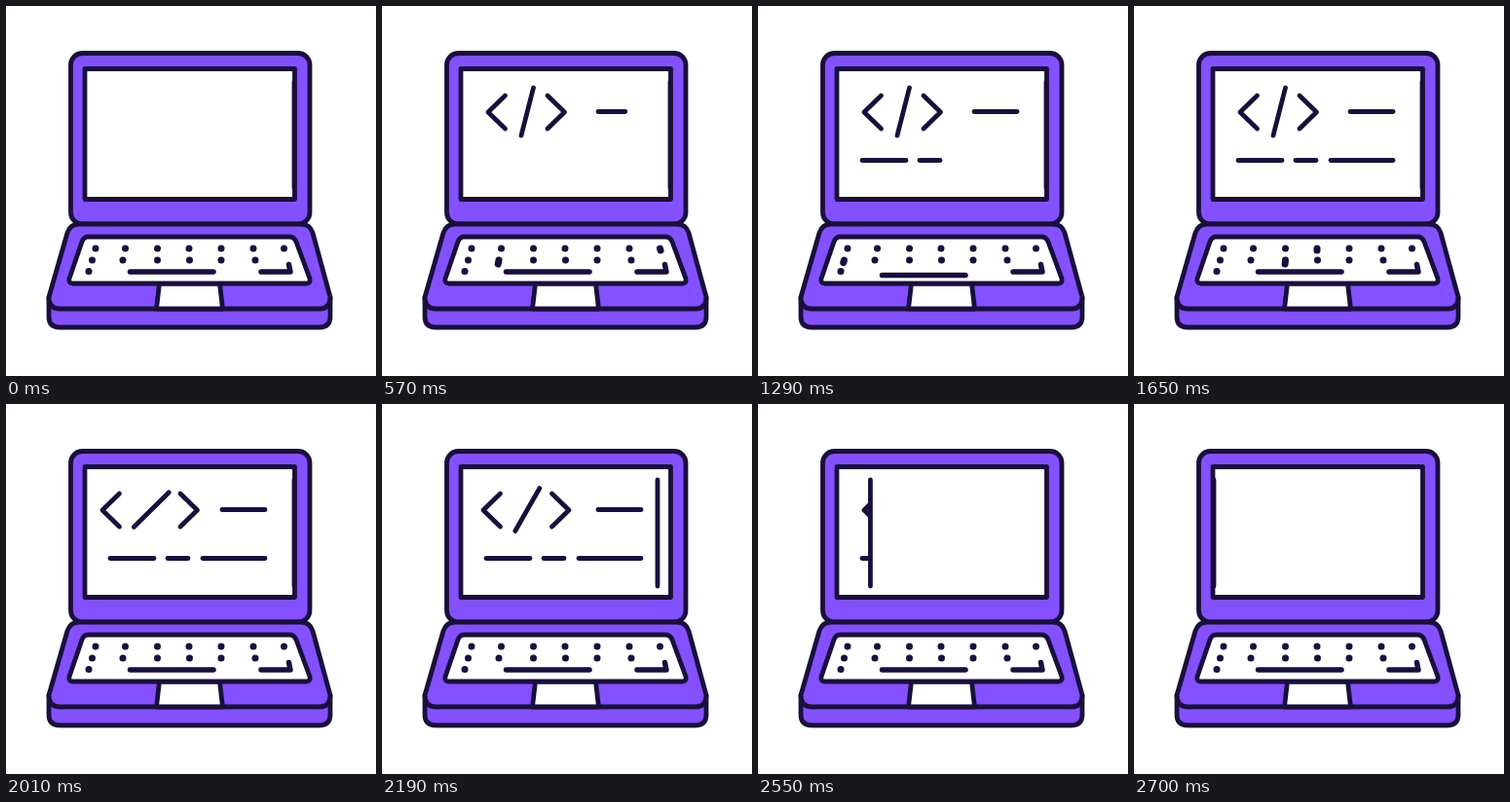
An HTML page for the animation above (4050 ms loop, 380 by 380 pixels).

```html
<!DOCTYPE html>
<html lang="en">
<head>
<meta charset="utf-8">
<title>Laptop typing code</title>
<style>
  html, body { margin: 0; width: 100%; height: 100%; overflow: hidden; background: #fff; }
  svg { display: block; width: 100vw; height: 100vh; }
  svg * { stroke-linecap: round; stroke-linejoin: round; }
  .ink { stroke: #1a0f3c; stroke-width: 4.8; fill: none; }
  .body { fill: #8351ff; }
  .paper { fill: #fff; }
  .key { stroke-width: 7; }
  .wide { stroke-width: 5.5; }
</style>
</head>
<body>
<svg viewBox="0 0 380 380">
  <defs>
    <clipPath id="shown"><rect id="wipe" x="70" y="60" width="226" height="145"/></clipPath>
  </defs>

  <g class="ink">
    <rect class="body" x="66.5" y="48.5" width="245.5" height="175.5" rx="12"/>
    <rect class="paper" x="81" y="64.5" width="215.5" height="134"/>
    <path class="body" d="M44 299V319Q44 330 55 330H322Q333 330 333 319V299Z"/>
    <path class="body" d="M75 224H303Q312 224 315 233L333 299Q333 311 322 311H55Q44 311 44 299L63 233Q66 224 75 224Z"/>
    <path class="paper" d="M157.5 285L154.5 311H222.5L219.5 285Z"/>
    <path class="paper" d="M84 237H291Q296 237 298 242L312 280Q313 285 308 285H69Q64 285 65 280L78 242Q80 237 84 237Z"/>
  </g>

  <g id="keys" class="ink"></g>
  <g id="code" class="ink" clip-path="url(#shown)"></g>
  <path id="bar" class="ink" d="M0 78V187"/>
</svg>

<script>
const LOOP = 4050, STEP = 30, MOVE_END = 2700;
const $ = id => document.getElementById(id);

function addPath(parent, d, cls = '') {
  const el = document.createElementNS('http://www.w3.org/2000/svg', 'path');
  el.setAttribute('d', d);
  el.setAttribute('class', cls);
  return parent.appendChild(el);
}

const clamp = p => Math.min(1, Math.max(0, p));
const span = (t, a, b) => clamp((t - a) / (b - a));
const ease = p => p * p * (3 - 2 * p);

// Written strokes: path, start time, end time
const strokes = [
  ['M126.5 92L109 109L126.5 126', 30, 180],
  ['M155.5 84L143 133', 180, 300],
  ['M170 92L187.5 109L170 126', 300, 430],
  ['M222 108.5H266', 450, 640],
  ['M107 158.5H152', 840, 1020],
  ['M166 158.5H187', 1080, 1200],
  ['M202 158.5H266', 1320, 1590]
].map(([d, a, b]) => {
  const el = addPath($('code'), d);
  el.setAttribute('pathLength', 1);
  return { el, a, b };
});

// Key positions with the middle times of their presses
const keys = [
  [92, 249, 150], [122.5, 249, 990], [155.5, 249, 390], [188, 249, 1590],
  [221, 249, 270], [254, 249, 1110], [285.5, 249, 510],
  [88.5, 261, 1240], [120, 261, 570], [155.5, 261, 1650],
  [188.5, 261, 870], [221, 261, 1380], [256, 261, 1500], [85, 272.5, 930]
].map(([x, y, at]) => ({ el: addPath($('keys'), '', 'key'), x, y, at }));

const space = addPath($('keys'), 'M127.5 273H213', 'wide');
const enter = addPath($('keys'), 'M262 273H292L290.5 265.5', 'wide');

const press = (t, at) => 4 * Math.sin(Math.PI * span(t, at - 90, at + 90));
const shift = (el, x, y = 0) => el.setAttribute('transform', `translate(${x} ${y})`);

function draw(time) {
  const t = Math.min(MOVE_END, Math.floor(time % LOOP / STEP) * STEP);

  for (const { el, a, b } of strokes) {
    const p = span(t, a, b);
    el.style.display = p ? '' : 'none';
    el.style.strokeDasharray = p < 1 ? `${p} 2` : 'none';
  }

  for (const { el, x, y, at } of keys) {
    const d = press(t, at);
    el.setAttribute('d', `M${x} ${y}l${(x - 188) * d * .003} ${d + .01}`);
  }
  shift(space, 0, press(t, 1260));
  shift(enter, 0, press(t, 750));

  const spread = ease(span(t, 1680, 1980)) - ease(span(t, 2040, 2340));
  shift(strokes[0].el, -10 * spread);
  shift(strokes[2].el, 9 * spread);
  strokes[1].el.setAttribute('transform', `rotate(${31 * spread} 149.3 108.7)`);

  const x = 296 - 214 * ease(span(t, 2100, 2700));
  shift($('bar'), x);
  $('wipe').setAttribute('width', x - 70);
}

let start;
function tick(now) {
  start ??= now;
  draw(now - start);
  requestAnimationFrame(tick);
}
draw(0);
requestAnimationFrame(tick);
</script>
</body>
</html>
```
